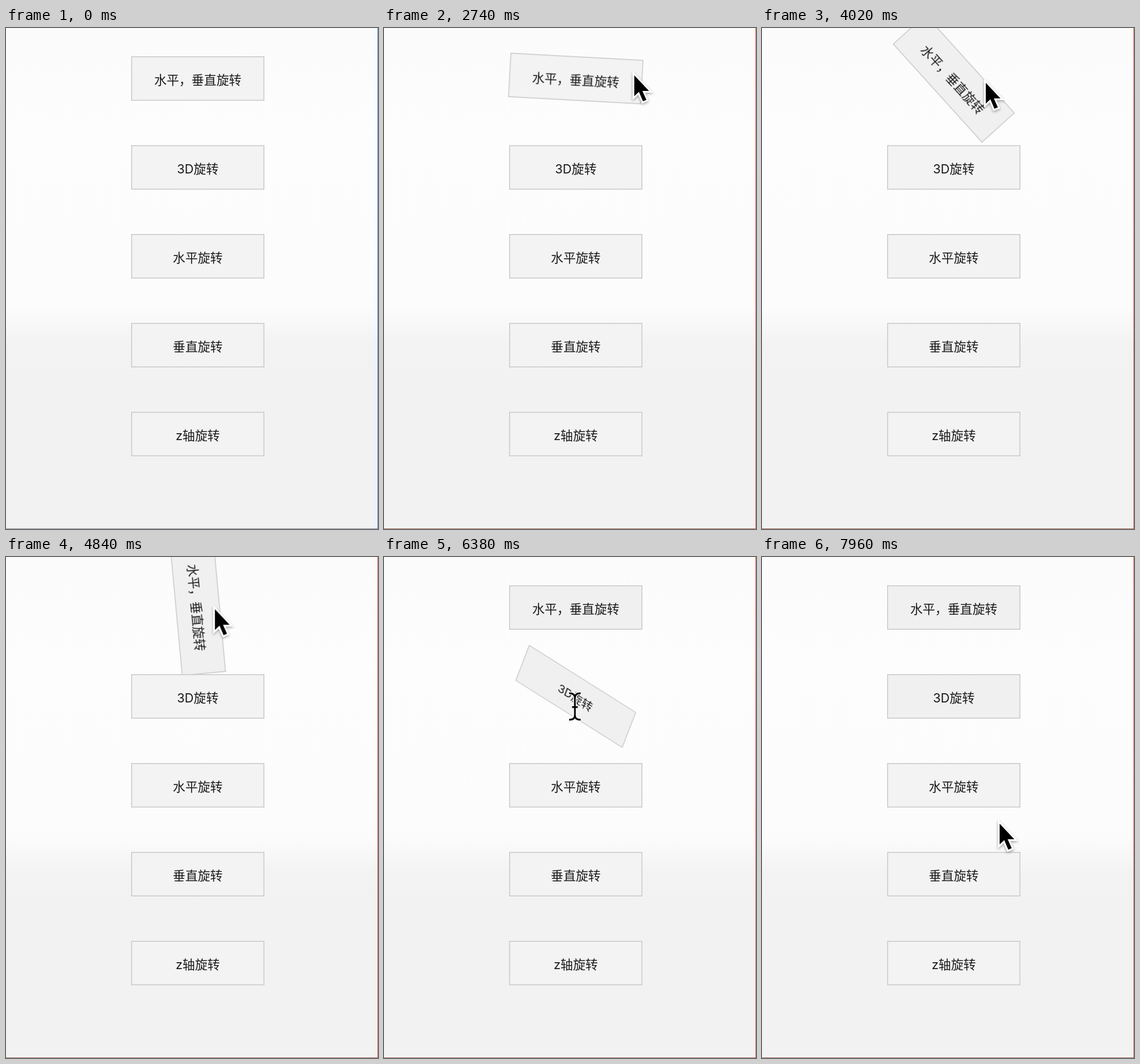
Animation, 645 px wide and 868 px high, one loop 8000 ms. Source, as an HTML page:

```html
<!DOCTYPE html>
<html lang="zh-CN">
<head>
<meta charset="utf-8">
<title>旋转</title>
<style>
html, body { margin: 0; width: 100%; height: 100%; overflow: hidden; }
.stage {
  position: absolute; left: 0; top: 0; width: 645px; height: 868px; overflow: hidden;
  background: linear-gradient(#fbfbfb 0, #fdfdfd 180px, #fcfcfc 484px, #f3f3f3 546px, #f2f2f2 600px);
}
.stage * { animation-duration: 8s; animation-iteration-count: infinite; animation-timing-function: linear; }

.card {
  position: absolute; left: 217px; top: calc(49.3px + 154px * var(--row));
  width: 231px; height: 77px; overflow: visible;
}
.card rect { fill: #f3f3f3; stroke: #c9c9c9; stroke-width: 1.5; }
.card text {
  font: 21.6px Inter, "Noto Sans CJK SC", "Noto Sans CJK", sans-serif;
  fill: #1a1a1a; text-anchor: middle;
}

.turn { animation-name: turn; }
.turn rect { animation-name: shade-first; }
.spin { animation-name: spin; }
.spin rect { animation-name: shade-second; }

@keyframes turn {
  0%, 33.75% { transform: rotate(0deg); }
  34.25% { transform: rotate(3deg); }
  35.9% { transform: rotate(16.5deg); animation-timing-function: ease-out; }
  36.6% { transform: rotate(18deg); animation-timing-function: ease-in-out; }
  38.5% { transform: rotate(10deg); animation-timing-function: ease-in-out; }
  42% { transform: rotate(50deg); animation-timing-function: ease-in-out; }
  46.3% { transform: rotate(20deg); }
  47% { transform: rotate(20deg); animation-timing-function: ease-in; }
  50.25% { transform: rotate(47.7deg); animation-timing-function: ease-out; }
  55.8% { transform: rotate(90deg); }
  60% { transform: rotate(90deg); animation-timing-function: ease; }
  66.9%, 100% { transform: rotate(0deg); }
}
@keyframes spin {
  0% { transform: rotate3d(1, 1, 1, 0deg); }
  72.8% { transform: rotate3d(1, 1, 1, 0deg); animation-timing-function: ease; }
  79.2% { transform: rotate3d(1, 1, 1, 45deg); }
  88.4% { transform: rotate3d(1, 1, 1, 45deg); animation-timing-function: ease; }
  96.5%, 100% { transform: rotate3d(1, 1, 1, 0deg); }
}
@keyframes shade-first { 0%, 36.2% { fill: #f3f3f3; } 36.3%, 100% { fill: #f0f0f0; } }
@keyframes shade-second { 0%, 73.2% { fill: #f3f3f3; } 73.3%, 100% { fill: #f0f0f0; } }

.edge { position: absolute; right: 0; bottom: 0; }
.side { width: 1px; height: 100%; animation-name: side; }
.base { width: 100%; height: 1px; animation-name: base; }
@keyframes side { 0%, 0.49% { background: #4a90e2; } 0.5%, 100% { background: #e2604a; } }
@keyframes base { 0%, 0.49% { background: #868c94; } 0.5%, 100% { background: #a3695a; } }

.cursor {
  position: absolute; left: 0; top: 0; width: 1px; height: 1px; overflow: visible;
  animation-name: travel;
}
.arrow {
  stroke: #fff; stroke-width: 6; paint-order: stroke;
  filter: drop-shadow(0 2px 2px rgba(0, 0, 0, .35));
  animation-name: arrow;
}
.beam { fill: none; stroke: #000; stroke-width: 3; animation-name: beam; }
.beam .halo { stroke: #fff; stroke-width: 6; }

@keyframes travel {
  0%, 4.7% { transform: translate(-60px, 900px); }
  4.75% { transform: translate(6px, 862px); }
  6.2% { transform: translate(68px, 850px); }
  8%, 15.4% { transform: translate(160px, 830px); }
  16.1% { transform: translate(205px, 811px); }
  16.6% { transform: translate(263px, 804px); }
  17.1% { transform: translate(372px, 793px); }
  17.6% { transform: translate(467px, 778px); }
  18.1% { transform: translate(543px, 754px); }
  18.75% { transform: translate(563px, 728px); }
  19.25% { transform: translate(583px, 680px); }
  19.75% { transform: translate(600px, 605px); }
  20.25% { transform: translate(606px, 520px); }
  20.75% { transform: translate(593px, 448px); }
  21.25% { transform: translate(577px, 368px); }
  21.9% { transform: translate(564px, 315px); }
  23%, 26% { transform: translate(556px, 254px); }
  28% { transform: translate(551px, 180px); }
  30% { transform: translate(527px, 121px); }
  32% { transform: translate(481px, 89px); }
  34.25%, 36% { transform: translate(434px, 82px); }
  42% { transform: translate(397px, 92px); }
  46%, 50.3% { transform: translate(388px, 95px); }
  54%, 59.3% { transform: translate(333px, 84px); }
  61% { transform: translate(374px, 93px); }
  64% { transform: translate(440px, 108px); }
  67.3% { transform: translate(479px, 122px); }
  69.1%, 69.5% { transform: translate(488px, 130px); }
  71.2% { transform: translate(464px, 168px); }
  73.4% { transform: translate(418px, 214px); }
  76% { transform: translate(362px, 248px); }
  78.5%, 87.7% { transform: translate(331px, 259px); }
  89.5% { transform: translate(386px, 268px); }
  91.5% { transform: translate(463px, 298px); }
  93.5% { transform: translate(508px, 338px); }
  95.4% { transform: translate(512px, 382px); }
  97.4% { transform: translate(490px, 424px); }
  98.5% { transform: translate(453px, 449px); }
  99.5%, 100% { transform: translate(412px, 462px); }
}
@keyframes arrow {
  0%, 52.9%, 60.2%, 76.4%, 88.8%, 100% { opacity: 1; }
  53%, 60.1%, 76.5%, 88.7% { opacity: 0; }
  60.2%, 76.4% { opacity: 1; }
}
@keyframes beam {
  0%, 52.9%, 60.2%, 76.4%, 88.8%, 100% { opacity: 0; }
  53%, 60.1%, 76.5%, 88.7% { opacity: 1; }
}
</style>
</head>
<body>
<div class="stage">
  <svg class="card" style="--row:4"><rect x=".75" y=".75" width="229.5" height="75.5"/><text x="115.5" y="48.7">z轴旋转</text></svg>
  <svg class="card" style="--row:3"><rect x=".75" y=".75" width="229.5" height="75.5"/><text x="115.5" y="48.7">垂直旋转</text></svg>
  <svg class="card" style="--row:2"><rect x=".75" y=".75" width="229.5" height="75.5"/><text x="115.5" y="48.7">水平旋转</text></svg>
  <svg class="card turn" style="--row:0"><rect x=".75" y=".75" width="229.5" height="75.5"/><text x="115.5" y="48.7">水平，垂直旋转</text></svg>
  <svg class="card spin" style="--row:1"><rect x=".75" y=".75" width="229.5" height="75.5"/><text x="115.5" y="48.7">3D旋转</text></svg>
  <div class="edge base"></div>
  <div class="edge side"></div>
  <svg class="cursor">
    <defs>
      <path id="caret" d="M-10-23C-4-23 0-21 0-15V15C0 21-4 23-10 23M10-23C4-23 0-21 0-15M0 15C0 21 4 23 10 23M-5 1H5"/>
    </defs>
    <path class="arrow" d="M0 0V36L8 28.5 15 45 21 42.5 14 27H25.5Z"/>
    <g class="beam"><use class="halo" href="#caret"/><use href="#caret"/></g>
  </svg>
</div>
</body>
</html>
```
